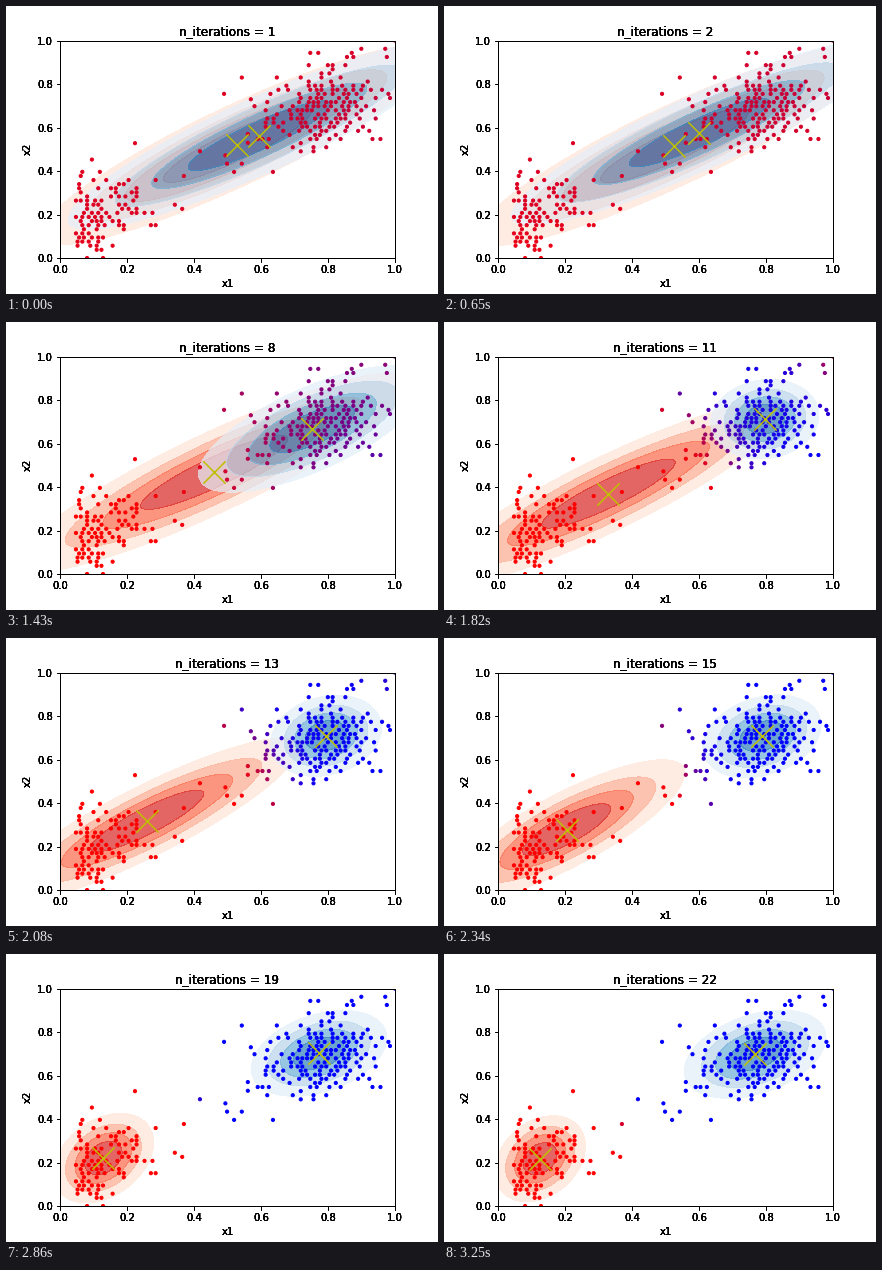
A matplotlib script for the animation above (4.29 s loop, 432 px wide and 288 px high).

```python
import numpy as np
import matplotlib.pyplot as plt
from matplotlib.animation import FuncAnimation

STEP_MS = 130
FRAMES = 33
HOLD = 5          # steps spent on the first iteration
LAST = 22         # final iteration
TURN = 11         # iteration at which blue is tightest

BOX = dict(left=.125, right=.9, bottom=.125, top=.88)
LEVELS = [.2, .4, .6, .8, 1.01]
SHADES = [.1, .3, .5, .7]
GRID = np.meshgrid(np.linspace(0, 1, 250), np.linspace(0, 1, 250))

# Isolated points between and around the two clusters
STRAYS = [(.49, .755), (.543, .83), (.57, .73), (.561, .53), (.561, .57),
          (.494, .472), (.418, .491), (.52, .396), (.499, .434), (.543, .434),
          (.636, .396), (.37, .377), (.343, .245), (.365, .226), (.224, .528),
          (1, 1)]


def lerp(a, b, t):
    return a + (b - a) * t


def smooth(t):
    return t * t * (3 - 2 * t)


def scatter_cluster(points, count, sample, low, high, gap=.013):
    """Add samples inside a box, kept apart from each other, on the data's steps."""
    target = len(points) + count
    while len(points) < target:
        p = np.round(np.array(sample()) * [210, 53]) / [210, 53]
        inside = np.all(p >= low) and np.all(p <= high)
        if inside and min(np.hypot(*(p - q)) for q in points) > gap:
            points.append(p)


def make_points():
    rng = np.random.default_rng(7)

    def lower():
        x = .04 + rng.gamma(2, .042)
        return x, .21 + .4 * (x - .125) + rng.normal(0, .1)

    def upper():
        a, b = rng.normal(size=2)
        return .785 + .1 * a, .70 + .03 * a + .1 * b

    points = [np.array(p) for p in STRAYS]
    scatter_cluster(points, 93, lower, (0, 0), (.31, .46))
    scatter_cluster(points, 163, upper, (.58, .49), (.99, .97))
    return np.array(points)


def red_state(n):
    """Weight, mean, spread and correlation as red retreats to the lower cluster."""
    logit = np.interp(n, [1, 6, TURN, 15, 17, LAST], [4.3, 2.5, 0, -1.42, -2.78, -7])
    s = 1 / (1 + np.exp(-logit))
    spread = 1 - (1 - s) ** 3
    return (lerp(.356, .846, s ** 1.3),
            lerp(.125, .535, s), lerp(.217, .523, s),
            lerp(.075, .330, spread), lerp(.110, .256, spread),
            lerp(.285, .900, 1 - (1 - s) ** 9))


def blue_state(n):
    """Blue shrinks onto the upper cluster, then relaxes to its final shape."""
    weight = 1 - red_state(n)[0]
    if n <= TURN:
        t = (n - 1) / (TURN - 1)
        shift, shrink = smooth(t), t ** 1.6
        return (weight, lerp(.595, .797, shift), lerp(.562, .712, t),
                lerp(.318, .090, shrink), lerp(.240, .102, shrink),
                lerp(.90, .10, t ** 4))
    t = (n - TURN) / (LAST - TURN)
    ease = smooth(t)
    return (weight, lerp(.797, .768, ease), lerp(.712, .698, t),
            lerp(.090, .118, ease), lerp(.102, .113, t),
            lerp(.10, .38, 1 - (1 - t) ** 2))


def bell(x, y, mx, my, sx, sy, rho):
    """Bivariate normal shape with a peak of one."""
    u, v = (x - mx) / sx, (y - my) / sy
    return np.exp(-(u * u - 2 * rho * u * v + v * v) / (2 * (1 - rho ** 2)))


def density(x, y, weight, mx, my, sx, sy, rho):
    scale = weight / (sx * sy * np.sqrt(1 - rho ** 2))
    return scale * bell(x, y, mx, my, sx, sy, rho)


POINTS = make_points()

fig, ax = plt.subplots(figsize=(6, 4), dpi=72)
fig.subplots_adjust(**BOX)
# Stacked empty axes darken the smooth edges of text and frame
stack = [ax] + [fig.add_subplot(label=str(i), facecolor="none") for i in range(4)]


def draw(frame):
    n = 1 if frame < HOLD else min(frame - HOLD + 2, LAST)
    red, blue = red_state(n), blue_state(n)

    ax.clear()
    for state, cmap in ((red, plt.cm.Reds), (blue, plt.cm.Blues)):
        ax.contourf(*GRID, bell(*GRID, *state[1:]), levels=LEVELS,
                    colors=cmap(SHADES), alpha=.7)

    r, b = density(*POINTS.T, *red), density(*POINTS.T, *blue)
    share = b / (r + b)
    colors = np.column_stack([1 - share, 0 * share, share])
    ax.scatter(*POINTS.T, s=10, c=colors, zorder=2)
    ax.scatter([red[1], blue[1]], [red[2], blue[2]], s=500, c="y",
               marker="x", zorder=3)

    for layer in stack:
        layer.set(xlim=(0, 1), ylim=(0, 1), xlabel="x1", ylabel="x2",
                  title=f"n_iterations = {n}")
    return []


anim = FuncAnimation(fig, draw, frames=FRAMES, interval=STEP_MS,
                     init_func=lambda: [], repeat=True, repeat_delay=0)
plt.show()
```
